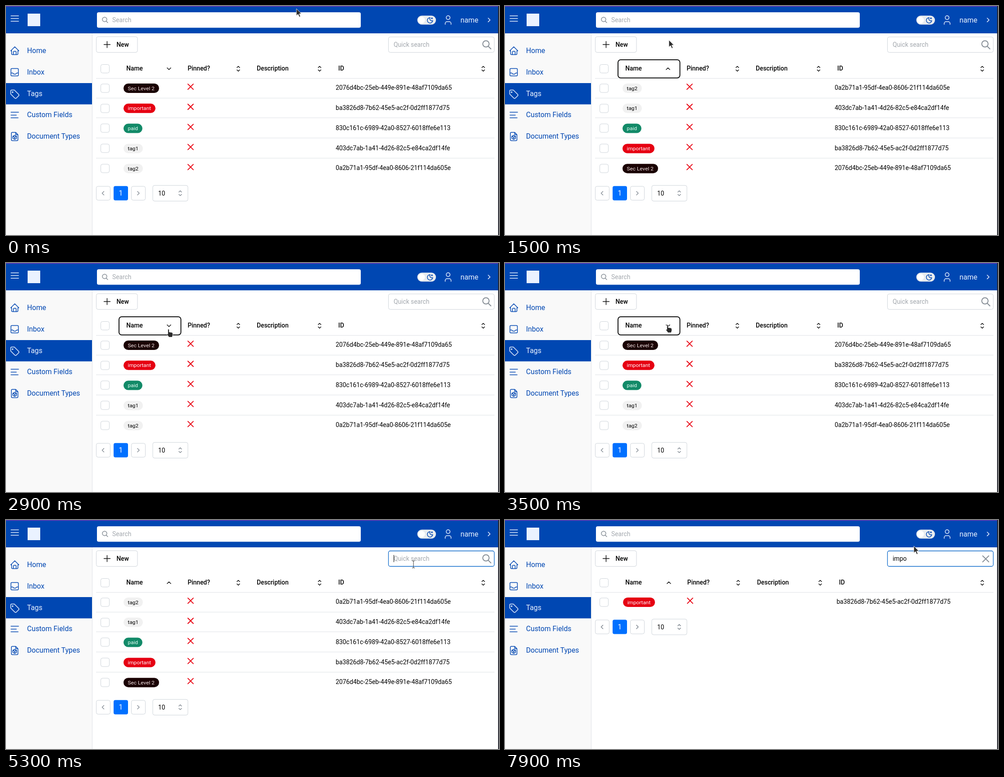
These frames come from a looping animation (1095 by 511 pixels, 8000 ms). An HTML page:

```html
<!DOCTYPE html>
<html lang="en">
<head>
<meta charset="utf-8">
<title>Tags table</title>
<style>
  html, body { margin: 0; width: 100%; height: 100%; overflow: hidden; background: #fff; }
  svg { display: block; width: 100vw; height: 100vh; }
  text { font: 13.8px Roboto, sans-serif; fill: #000; white-space: pre; }
  .nav, .nav text { font-size: 15.8px; }
  .nav text { fill: #0047b2; }
  .bold { font-weight: 500; }
  .pill { font-size: 11.8px; }
  .hint { fill: #a3a8ae; }
  .line { fill: none; stroke: #0047b2; stroke-width: 1.5; stroke-linecap: round; stroke-linejoin: round; }
  .light { stroke: #eaf2ff; }
  .dark { stroke: #111; }
  .gray { stroke: #868e96; }
  .box { fill: #fff; stroke: #ced4da; }
  .rule { stroke: #dee2e6; }
</style>
</head>
<body>
<svg viewBox="0 0 1095 511">
  <rect width="1095" height="61" fill="#0047b2"/>
  <rect width="1095" height="1.3" fill="#7b35b5"/>

  <path class="line light" d="M11 22H28M11 28H28M11 34H28"/>
  <rect x="48" y="17" width="28" height="28" fill="#eaf2ff"/>
  <rect x="202" y="14" width="586" height="34.5" rx="4" fill="#fff"/>
  <path class="line gray" d="M214 30a5 5 0 1 0 10 0a5 5 0 1 0-10 0M222.6 33.8L226 37.3"/>
  <text class="hint" x="236" y="36">Search</text>
  <rect x="913.5" y="21.5" width="41.5" height="20" rx="10" fill="#e9ecef"/>
  <circle cx="923" cy="31.5" r="7.5" fill="#fff"/>
  <path class="line" d="M942 26a4.6 4.6 0 0 0 5.8 6.6a6 6 0 1 1-5.8-6.6M946 26v3M944.5 27.5h3"/>
  <path class="line light" d="M977.8 26a4.2 4.2 0 1 0 8.4 0a4.2 4.2 0 1 0-8.4 0M975.5 41v-2a4 4 0 0 1 4-4h5a4 4 0 0 1 4 4v2M1071 27l4.2 4.2l-4.2 4.2"/>
  <text class="nav" x="1009.5" y="36.5" style="fill:#eaf2ff">name</text>

  <rect y="61" width="191" height="450" fill="#f9f9f9"/>
  <path d="M191.5 61V511" stroke="#dee2e6"/>
  <rect y="172" width="191" height="47.5" fill="#0047b2"/>
  <g class="nav">
    <text x="46.7" y="105">Home</text>
    <text x="46.7" y="153">Inbox</text>
    <text x="46.7" y="201" style="fill:#eaf2ff">Tags</text>
    <text x="46.7" y="248.3">Custom Fields</text>
    <text x="46.7" y="296.3">Document Types</text>
  </g>
  <path class="line" stroke-width="1.7" d="M12.5 100H10.5L19.5 91L28.5 100H26.5M12.5 100V106.5a2 2 0 0 0 2 2H24.5a2 2 0 0 0 2-2V100M16.5 108V103a2 2 0 0 1 2-2h2a2 2 0 0 1 2 2V108"/>
  <path class="line" d="M13 139.5H25.500a2 2 0 0 1 2 2V154a2 2 0 0 1-2 2H13a2 2 0 0 1-2-2V141.500a2 2 0 0 1 2-2M11 149.500h4l2.500 2.500h4l2.500-2.500h3.500"/>
  <path class="line light" d="M10.500 189.500a2 2 0 0 1 2-2H18.500L28 197a2.500 2.500 0 0 1 0 3.500L23 205.500a2.500 2.500 0 0 1-3.500 0L10.500 196.500ZM14 191.500h1.500v1.500h-1.500z"/>
  <path class="line" d="M11 237H28M11 243.500H23M11 249.500H27"/>
  <path class="line" d="M14 282H21.500L26.500 287V298.500a2 2 0 0 1-2 2H14a2 2 0 0 1-2-2V284a2 2 0 0 1 2-2M21.500 282V287H26.500M19.300 288.500l4 2.200v4.600l-4 2.200l-4-2.200v-4.600zM15.300 290.700l4 2.300l4-2.300M19.300 293v4.500"/>

  <rect class="box" x="200.5" y="68.500" width="91.500" height="35" rx="4"/>
  <path class="line dark" d="M217.500 86H231.500M224.500 79V93"/>
  <text class="bold" x="245.500" y="91">New</text>

  <g id="content"></g>
  <rect x="1093" width="2" height="511" fill="#25262f"/>
  <g id="cursor"></g>
</svg>
<script>
const LOOP = 8000, STEP = 100, ROW = 44.8;
const content = document.getElementById('content');
const cursor = document.getElementById('cursor');

const tags = [
  ['Sec Level 2', '2076d4bc-25eb-449e-891e-48af7109da65', 79, '#1a0203', '#f3e6e6'],
  ['important', 'ba3826d8-7b62-45e5-ac2f-0d2ff1877d75', 71, '#e60012', '#fff'],
  ['paid', '830c161c-6989-42a0-8527-6018ffe6e113', 42, '#128a68', '#e6fff6'],
  ['tag1', '403dc7ab-1a41-4d26-82c5-e84ca2df14fe', 43, '#f1f1f1', '#000'],
  ['tag2', '0a2b71a1-95df-4ea0-8606-21f114da605e', 43, '#f1f1f1', '#000'],
];

// Pointer path: time, x, y
const track = [
  [200, 645, 6], [900, 353, 143], [1100, 357, 137],
  [1300, 357, 137], [1500, 364, 76], [1700, 362, 187],
  [1800, 362, 187], [2300, 360, 134],
  [2800, 360, 134], [3100, 362, 187], [3500, 361, 138],
  [3800, 361, 138], [4100, 361, 169],
  [4200, 361, 169], [5100, 905, 99],
  [5300, 905, 99], [5500, 908, 58],
];

const pointers = {
  arrow: '<path d="M0 0V15.500L3.700 12.200L6.500 18.500L9 17.400L6.300 11.300H11Z" fill="#2b2b2b" stroke="#fff" stroke-width=".8"/>',
  hand: '<path d="M-1.500 1a1.500 1.500 0 0 1 3 0V6L7.500 7Q9.500 7.500 9.500 10V13L8 17.500H1L-3.500 11.500Q-3.500 9-1.500 10.500Z" fill="#2b2b2b" stroke="#fff" stroke-width=".8"/>',
  beam: '<path d="M-3-8H-1L0-7L1-8H3M0-7V7M-3 8H-1L0 7L1 8H3" fill="none" stroke="#333"/>',
};

const text = (x, y, value, cls = '', style = '') =>
  `<text x="${x}" y="${y}" class="${cls}" style="${style}">${value}</text>`;
const line = (d, cls = 'dark', style = '') => `<path class="line ${cls}" d="${d}" style="${style}"/>`;
const rect = (x, y, w, h, style = '', rx = 4) =>
  `<rect class="box" x="${x}" y="${y}" width="${w}" height="${h}" rx="${rx}" style="${style}"/>`;
const checkbox = y => rect(210.5, y - 9, 19, 19);
const sorter = (x, y, cls) => line(`M${x - 3} ${y - 2.5}l3-3l3 3M${x - 3} ${y + 2.5}l3 3l3-3`, cls);
const between = (t, a, b) => t >= a && t < b;

function tableHead(k, reversed, focused) {
  const tip = reversed ? -2 : 2;
  return checkbox(139.5)
    + text(267.3, 144.3, 'Name', 'bold')
    + line(`M${358 + k} ${140 - tip}l4 ${2 * tip}l4 ${-2 * tip}`)
    + text(403.5 + .7 * k, 144.3, 'Pinned?', 'bold') + sorter(516 + k, 140)
    + text(557 + 1.5 * k, 144.3, 'Description', 'bold') + sorter(696.5 + 1.9 * k, 140)
    + text(738 + 2 * k, 144.3, 'ID', 'bold') + sorter(1060, 140)
    + '<path class="rule" d="M200 161.5H1085"/>'
    + (focused ? rect(251, 120, 137.5, 40.5, 'fill:none;stroke:#111;stroke-width:2', 6) : '');
}

function tableRow([name, id, width, fill, ink], i, k) {
  const y = 182.7 + i * ROW, x = 261 + .6 * k;
  return (i ? `<path class="rule" d="M200 ${Math.round(y - 22.8) + .5}H1085"/>` : '')
    + checkbox(Math.round(y))
    + rect(x, y - 9.7, width, 21, `fill:${fill};stroke:none`, 10.5)
    + text(x + 9.6, y + 4.8, name, 'pill', `fill:${ink}`)
    + line(`M${404 + .6 * k} ${y - 8.5}l12 12m0-12l-12 12`, '', 'stroke:#e8000f;stroke-width:1.9')
    + text(732.2 + 2.2 * k, y + 4.5, id);
}

function pager(y) {
  return rect(200.5, y - 15.5, 31, 31) + line(`M217.500 ${y - 4}l-4 4l4 4`, 'gray')
    + rect(239, y - 16, 32, 32, 'fill:#0070ff;stroke:none')
    + text(250.5, y + 5.5, 1, '', 'font-size:15.8px;fill:#fff')
    + rect(278.5, y - 15.5, 31, 31) + line(`M292 ${y - 4}l4 4l-4 4`, 'gray')
    + rect(326, y - 17.5, 78, 35) + text(338, y + 5, 10) + sorter(387, y, 'gray');
}

function quickSearch(t) {
  const typed = 'impo'.slice(0, [6300, 6400, 7200, 7300].filter(s => t >= s).length);
  const caretOn = between(t, 5200, 5800) || between(t, 6300, 7000) || between(t, 7200, 7800);
  return rect(849.5, 69, 235, 34.5, t >= 5200 ? 'stroke:#0b67c9;stroke-width:1.3' : '')
    + (typed
      ? text(861, 91, typed, 'typed') + line('M1061 80l13.500 13.500m0-13.500l-13.500 13.500', 'gray', 'stroke-width:1.9')
      : text(861, 91, 'Quick search', 'hint')
        + line('M1059 84.500a7 7 0 1 0 14 0a7 7 0 1 0-14 0M1071 89.700L1077 95.700', 'gray', 'stroke-width:2'))
    + (caretOn ? '<path id="caret" d="M0 78V94" stroke="#000"/>' : '');
}

function pointerAt(t) {
  const next = track.findIndex(key => key[0] > t);
  if (next === 0) return track[0].slice(1);
  if (next < 0) return track[track.length - 1].slice(1);
  const [t0, x0, y0] = track[next - 1], [t1, x1, y1] = track[next];
  const p = (t - t0) / (t1 - t0), ease = p * p * (3 - 2 * p);
  return [x0 + (x1 - x0) * ease, y0 + (y1 - y0) * ease];
}

function pointerKind(x, y) {
  const inside = (l, t, r, b) => between(x, l, r) && between(y, t, b);
  if (inside(250, 119, 1085, 161)) return 'hand';
  if (inside(202, 14, 788, 48) || inside(849, 69, 1085, 104)) return 'beam';
  return 'arrow';
}

function render(t) {
  const query = t < 6400 ? '' : t < 7900 ? 'i' : 'impo';
  const reversed = [1400, 2900, 3900].filter(s => t >= s).length % 2 === 1;
  const rows = tags.filter(tag => tag[0].includes(query));
  if (reversed) rows.reverse();
  const spread = { 5: 0, 2: 1, 1: 1.9 }[rows.length];

  content.innerHTML = quickSearch(t)
    + tableHead(spread, reversed, between(t, 1300, 5200))
    + rows.map((row, i) => tableRow(row, i, spread)).join('')
    + pager(193.8 + rows.length * ROW);

  const caret = document.getElementById('caret');
  if (caret) {
    const typed = content.querySelector('.typed');
    const x = Math.floor(861 + (typed ? typed.getComputedTextLength() : 0)) + .5;
    caret.setAttribute('transform', `translate(${x} 0)`);
  }

  const [x, y] = pointerAt(t).map(Math.round);
  cursor.setAttribute('transform', `translate(${x} ${y})`);
  cursor.innerHTML = pointers[pointerKind(x, y)];
}

const start = performance.now();
let shown = -1;
function frame() {
  const t = Math.floor((performance.now() - start) % LOOP / STEP) * STEP;
  if (t !== shown) render(shown = t);
  requestAnimationFrame(frame);
}
frame();
</script>
</body>
</html>
```
